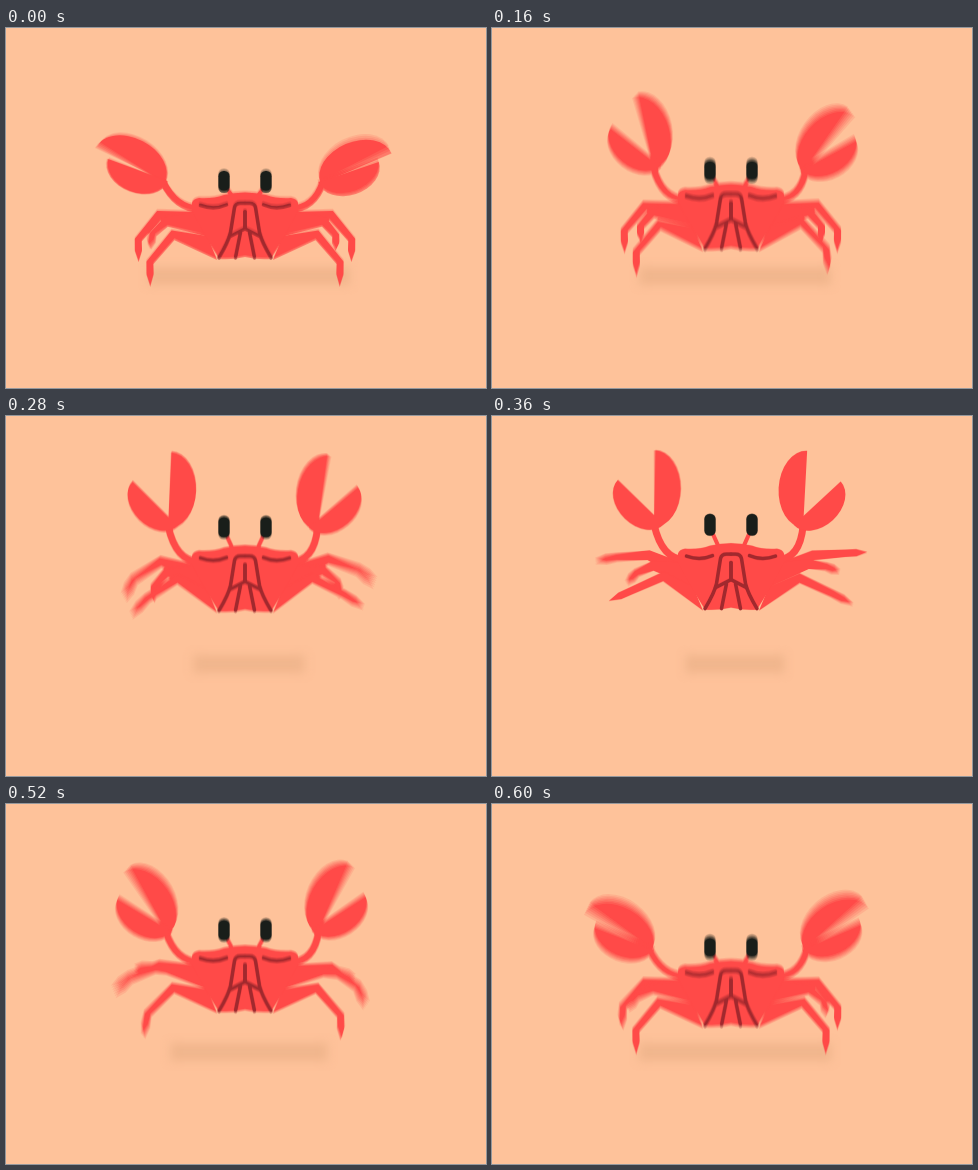
Recreate the animation shown at these times as an HTML page with a canvas. Size 480x360 px, loop 0.64 s.

```html
<!DOCTYPE html>
<html lang="en">
<head>
<meta charset="utf-8">
<title>Jumping crab</title>
<style>
html, body { margin: 0; width: 480px; height: 360px; overflow: hidden; background: #fec29a; }
canvas { display: block; }
</style>
</head>
<body>
<canvas id="stage" width="480" height="360"></canvas>
<script>
const LOOP = 640, STEP = 40, SHUTTER = 20, SAMPLES = 7;
const SAND = '#fec29a', SHADE = '#f1b68d', RED = '#ff4a48', DARK = '#a1292e', BLACK = '#191e1a';
const RAD = Math.PI / 180;

const screen = document.getElementById('stage').getContext('2d');
const layer = document.createElement('canvas');
layer.width = 480;
layer.height = 360;
const c = layer.getContext('2d');

// Left side; the right side is mirrored. Peak is when a leg is splayed furthest.
const LEGS = [
  { hip: [195, 196], thigh: 43, rise: 11, shin: 32, foot: 22, peak: 415, splay: 95 },
  { hip: [195, 196], thigh: 35, rise: 3, shin: 18, foot: 15, peak: 475, splay: 100 },
  { hip: [206, 220], thigh: 41, rise: 18, shin: 36, foot: 24, peak: 365, splay: 66 }
];

const CLAWS = [
  { start: -14, low: -66, swing: 69, x: 162 },
  { start: 40, low: -82, swing: 79, x: 167 }
];

const wrap = t => (t % LOOP + LOOP) % LOOP;
const mix = (a, b, u) => a + (b - a) * u;

// Eased push off the ground, then free fall.
function jump(time) {
  const t = wrap(time), top = 320, takeoff = 80;
  if (t < takeoff) return 0;
  if (t > top) return 38 * (((t - top) / (LOOP - top)) ** 2 - 1);
  return -19 * (1 - Math.cos(Math.PI * (t - takeoff) / (top - takeoff)));
}

function bump(t, peak) {
  const d = (wrap(t - peak + LOOP / 2) - LOOP / 2) / 215;
  return Math.abs(d) < 1 ? Math.cos(d * Math.PI / 2) ** 2 : 0;
}

function line(width, color, d) {
  c.lineWidth = width;
  c.strokeStyle = color;
  c.stroke(new Path2D(d));
}

function mirrored(draw) {
  for (const side of [0, 1]) {
    c.save();
    if (side) c.transform(-1, 0, 0, 1, 478, 0);
    draw(side);
    c.restore();
  }
}

function drawShadow(lift) {
  const half = 101 + 0.5 * lift - 0.024 * lift * lift;
  c.filter = 'blur(4.5px)';
  c.fillStyle = SHADE;
  c.fillRect(243 - half, 239, half * 2, 18);
  c.filter = 'none';
}

// Angles are measured from straight down, outwards.
function drawLeg({ hip: [x, y], thigh, rise, shin, foot, peak, splay }, t) {
  const open = bump(t, peak);
  const a = 90 + rise + 16 * bump(t, peak - 40);
  const b = mix(40, splay, open), d = mix(-1, splay, open);
  const outer = [[x - 5, y - 12]], inner = [[x + 5, y + 12]];
  const move = (length, angle, bend, width) => {
    x -= length * Math.sin(angle * RAD);
    y += length * Math.cos(angle * RAD);
    const nx = width * Math.cos(bend * RAD), ny = width * Math.sin(bend * RAD);
    outer.push([x - nx, y - ny]);
    inner.unshift([x + nx, y + ny]);
  };
  move(thigh, a, (a + b) / 2, 5);
  move(shin, b, (b + d) / 2, 3.7);
  move(foot / 2, d, d, 3.6);
  move(foot / 2, d, d, 0);
  c.beginPath();
  [...outer, ...inner].forEach(p => c.lineTo(...p));
  c.fill();
}

function drawClaw({ start, low, swing, x }, t) {
  const raise = Math.abs(Math.sin(Math.PI * (t - start) / LOOP));
  const tilt = Math.max(-67, low + swing * raise), a = tilt * RAD;
  const open = 46 + 0.62 * tilt;
  x += 0.2 * tilt;
  const y = 138 - 0.2 * tilt;
  line(7, RED, `M193 181Q170 181 ${x - 8 * Math.sin(a)} ${y + 8 * Math.cos(a)}`);
  c.translate(x, y);
  c.rotate(a);
  c.beginPath();
  c.ellipse(0, -28, 26.5, 38.5, 0, -Math.PI / 2, Math.PI / 2);
  c.fill();
  c.rotate(-open * RAD);
  c.beginPath();
  c.ellipse(1, -19.5, 23, 32, 0, Math.PI / 2, Math.PI * 1.5);
  c.fill();
}

function drawScene(t) {
  const lift = jump(t), eye = 143 + lift * 0.21;
  c.fillStyle = SAND;
  c.fillRect(0, 0, 480, 360);
  drawShadow(lift);

  c.save();
  c.translate(0, lift);
  c.fillStyle = RED;
  c.lineCap = c.lineJoin = 'round';
  mirrored(side => {
    LEGS.forEach(leg => drawLeg(leg, t + side * 35));
    line(4, RED, `M219 ${eye + 16}L227 169`);
    drawClaw(CLAWS[side], t);
  });
  c.fill(new Path2D('M186 184V175Q187 171 193 170Q207 171 218 167Q239 162 260 167Q271 171 285 170Q291 171 292 175V184L279 208L265 231Q252 232 239 229Q226 232 213 231L199 208Z'));

  mirrored(() => {
    line(3.5, DARK, 'M194.5 177.5Q208 182.5 220.5 177');
    line(3.5, DARK, 'M213 230Q222.5 214 224.5 205L228.5 180Q229.5 175.5 234.5 175.5H239');
    line(3.5, DARK, 'M239 184V201L223.5 209M234.5 205L229.5 230');
    c.fillStyle = BLACK;
    c.beginPath();
    c.roundRect(212.3, eye, 11.4, 22, 5.2);
    c.fill();
  });
  c.restore();
}

// Averaging moments around t gives the motion blur.
function frame(now) {
  const t = Math.floor(now % LOOP / STEP) * STEP;
  for (let i = 0; i < SAMPLES; i++) {
    drawScene(t + (i / (SAMPLES - 1) - 0.5) * SHUTTER);
    screen.globalAlpha = 1 / (i + 1);
    screen.drawImage(layer, 0, 0);
  }
  requestAnimationFrame(() => frame(performance.now() - start));
}
const start = performance.now();
frame(0);
</script>
</body>
</html>
```
